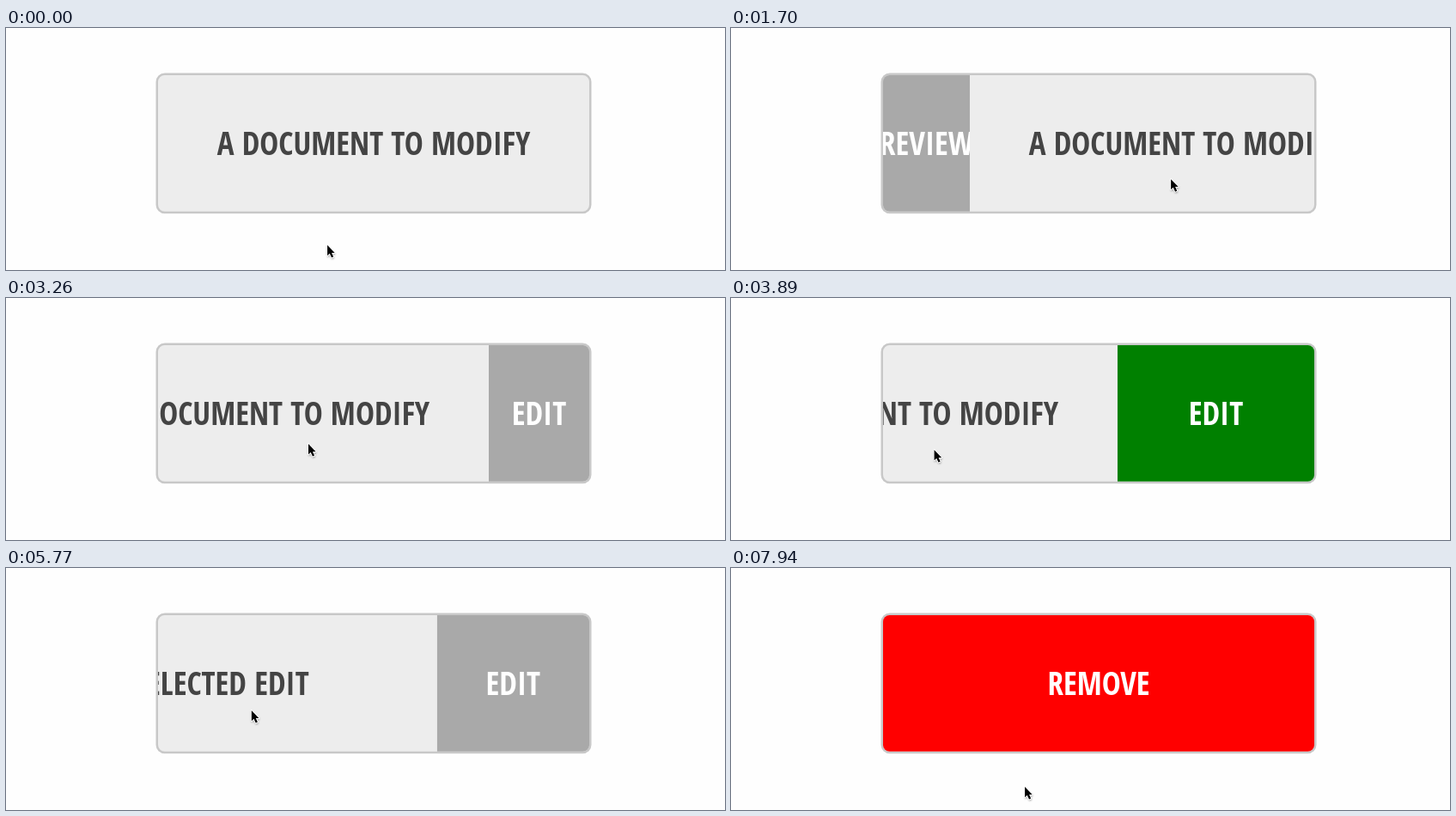
Write an HTML page that moves like this. It is 837 px wide and 282 px high and loops after 8 s.

```html
<!DOCTYPE html>
<html lang="en">
<head>
<meta charset="utf-8">
<title>Swipe actions</title>
<style>
  html, body { margin: 0; width: 100%; height: 100%; overflow: hidden; background: #fefefe; }
  svg { display: block; width: 837px; height: 282px; }
  text {
    font: 700 37px "Open Sans Condensed", "Open Sans", "Noto Sans", sans-serif;
    font-stretch: 75%;
    text-anchor: middle;
  }
</style>
</head>
<body>
<svg viewBox="0 0 837 282">
  <defs>
    <clipPath id="inside"><rect x="177" y="55" width="502" height="158.7" rx="7.5"/></clipPath>
    <clipPath id="paneClip"><rect id="paneArea" y="55" height="159"/></clipPath>
    <filter id="soft" x="-50%" y="-50%" width="200%" height="200%"><feGaussianBlur stdDeviation="1"/></filter>
    <path id="arrow" d="M.6 1V13.2L3.3 10.7L5.5 15.5L7.7 14.5L5.6 9.9H9.2Z"/>
  </defs>
  <rect x="175.75" y="53.75" width="504.5" height="161.2" rx="9" fill="#ededed" stroke="#c8c8c8" stroke-width="2.5"/>
  <g clip-path="url(#inside)">
    <text id="title" y="147.5" fill="#444"></text>
    <g id="pane" clip-path="url(#paneClip)">
      <rect id="fill" y="55" height="159"/>
      <text id="label" y="147.5" fill="#fff"></text>
    </g>
  </g>
  <g id="cursor">
    <use href="#arrow" x="0.5" y="1.5" stroke="#000" opacity=".4" filter="url(#soft)"/>
    <use href="#arrow" stroke="#fff" stroke-width="2" stroke-linejoin="round"/>
    <use href="#arrow"/>
  </g>
</svg>
<script>
const LOOP = 8000, RESET = 4950, SETTLE = 280;
const LEFT = 177, WIDTH = 502, RIGHT = LEFT + WIDTH;
const ACTIVATE = 200, REMOVE = 273;

// pointer moves: start, end, x, y
const home = [373.5, 252];
const moves = [
  [470, 770, 410.5, 176],
  [1050, 1820, 530, 175],
  [2220, 2600, 468.5, 162],
  [2620, 3890, 236.5, 176],
  [3890, 4000, 180, 178],
  [4220, 4650, 330, 243],
  [RESET, 5240, 462.5, 165],
  [5500, 5770, 285.5, 165],
  [5770, 6590, 55.5, 169],
  [6590, 6880, 14, 170],
  [7500, 7940, 341.5, 254]
];
const drags = [
  { down: 1050, up: 1850 },
  { down: 2620, up: 4210 },
  { down: 5500, up: 7500 }
];

const clamp = k => Math.min(1, Math.max(0, k));
const mix = (a, b, k) => a + (b - a) * k;
const easeOut = k => 1 - (1 - k) ** 2;

function pointer(t) {
  return moves.reduce(([x, y], [start, end, toX, toY]) => {
    const k = clamp((t - start) / (end - start));
    return [mix(x, toX, k), mix(y, toY, k)];
  }, home);
}

// The card follows the pointer, then resists like a rubber band.
function stretch(distance) {
  const size = Math.abs(distance), free = 220, give = 56;
  const extra = Math.max(0, size - free);
  return Math.sign(distance) * (Math.min(size, free) + give * (1 - Math.exp(-extra / 70)));
}

// On release a weak pull springs back and a strong one fills the card.
function swipe(t) {
  const drag = drags.findLast(d => d.down <= t);
  if (!drag || (t >= RESET && drag.down < RESET)) return { pull: 0, offset: 0 };
  const pull = stretch(pointer(Math.min(t, drag.up))[0] - pointer(drag.down)[0]);
  const goal = Math.abs(pull) < ACTIVATE ? 0 : Math.sign(pull) * WIDTH;
  return { pull, offset: mix(pull, goal, easeOut(clamp((t - drag.up) / SETTLE))) };
}

function actionFor(pull) {
  if (pull < -REMOVE) return ["REMOVE", "#f00"];
  return [pull > 0 ? "REVIEW" : "EDIT", Math.abs(pull) < ACTIVATE ? "#a9a9a9" : "#008000"];
}

const [title, pane, area, fill, label, cursor] =
  ["title", "pane", "paneArea", "fill", "label", "cursor"].map(id => document.getElementById(id));

function set(node, attrs) {
  for (const key in attrs) node.setAttribute(key, attrs[key]);
}

function draw(t) {
  const { pull, offset } = swipe(t);
  const [name, color] = actionFor(pull);
  const width = Math.abs(offset);
  const start = offset > 0 ? LEFT : RIGHT - width;

  title.textContent = t < RESET ? "A DOCUMENT TO MODIFY" : "SELECTED EDIT";
  set(title, { x: LEFT + WIDTH / 2 + offset });
  set(pane, { visibility: width > 4 ? "visible" : "hidden" });
  set(area, { x: start, width });
  set(fill, { x: start, width, fill: color });
  label.textContent = name;
  set(label, { x: start + width / 2 });
  set(cursor, { transform: `translate(${pointer(t)})` });
}

const origin = performance.now();
function tick() {
  draw((performance.now() - origin) % LOOP);
  requestAnimationFrame(tick);
}
tick();
</script>
</body>
</html>
```
